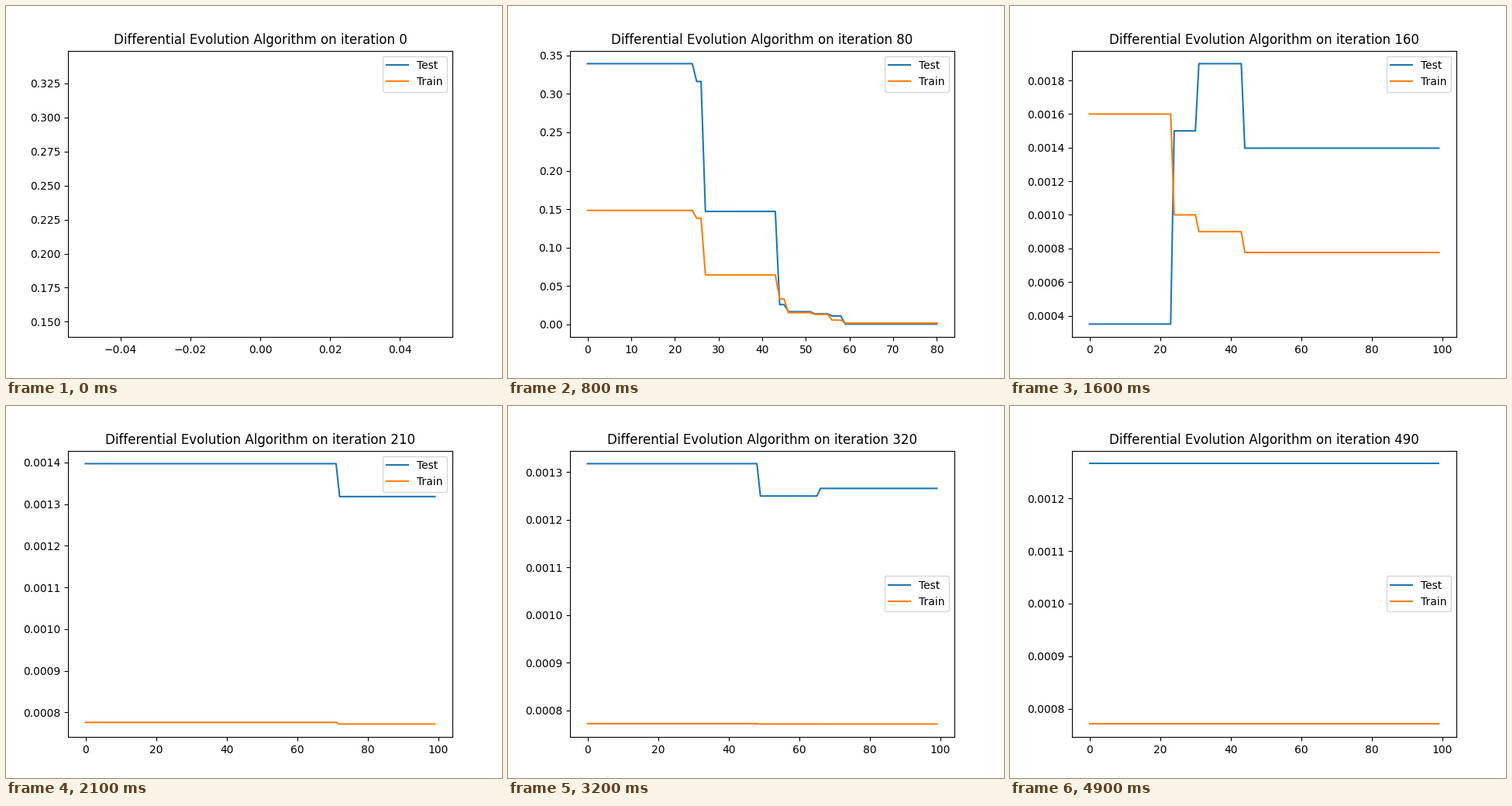
Write a matplotlib script that moves like this. It is 640x480 px and loops after 5.91 s.

```python
import numpy as np
import matplotlib.pyplot as plt
from matplotlib.animation import FuncAnimation

LOOP = 5910
INTERVAL = 30
STEP_MS = 100       # time between plot updates
STRIDE = 10         # iterations per update
LAST = 490
WINDOW = 100        # history length on screen

# iterations at which a better candidate is found
FOUND = [0, 25, 27, 44, 46, 52, 56, 59, 85, 92, 105, 183, 270, 287]


def test_levels():
    fall = 0.0165 - 0.0028 * np.arange(3)
    return np.r_[0.3394, 0.3162, 0.147, 0.0257, fall, 0.00035,
                 0.0015, 0.0019, 0.001397, 0.001318, 0.00125, 0.001266]


def train_levels():
    # starts in proportion to the test loss, ends converging on a floor
    early = 0.437 * test_levels()[:3]
    late = 0.000771 + 5e-6 * 0.2 ** np.arange(4)
    return np.r_[early, 0.0331, 0.0152, 0.013, 0.0055, 0.0016,
                 0.001, 0.0009, late]


def history(levels):
    """Hold each level until the next candidate is found."""
    return np.repeat(levels, np.diff(FOUND + [LAST + 1]))


plt.rcParams["font.family"] = "DejaVu Sans"
fig, ax = plt.subplots(figsize=(6.4, 4.8), dpi=100)
curves = [
    (ax.plot([], [], label=name)[0], history(levels))
    for name, levels in (("Test", test_levels()), ("Train", train_levels()))
]
ax.legend(loc="best")


def update(frame):
    # the offset lets each update land on or just before its due time
    step = (frame * INTERVAL + 20) // STEP_MS
    iteration = min(step * STRIDE, LAST)
    first = max(0, iteration + 1 - WINDOW)
    for line, losses in curves:
        shown = losses[first:iteration + 1]
        line.set_data(np.arange(len(shown)), shown)
    ax.relim()
    ax.autoscale_view()
    ax.set_title(f"Differential Evolution Algorithm on iteration {iteration}")
    return []


anim = FuncAnimation(fig, update, frames=LOOP // INTERVAL, interval=INTERVAL,
                     init_func=lambda: update(0), repeat=True, repeat_delay=0)
plt.show()
```
